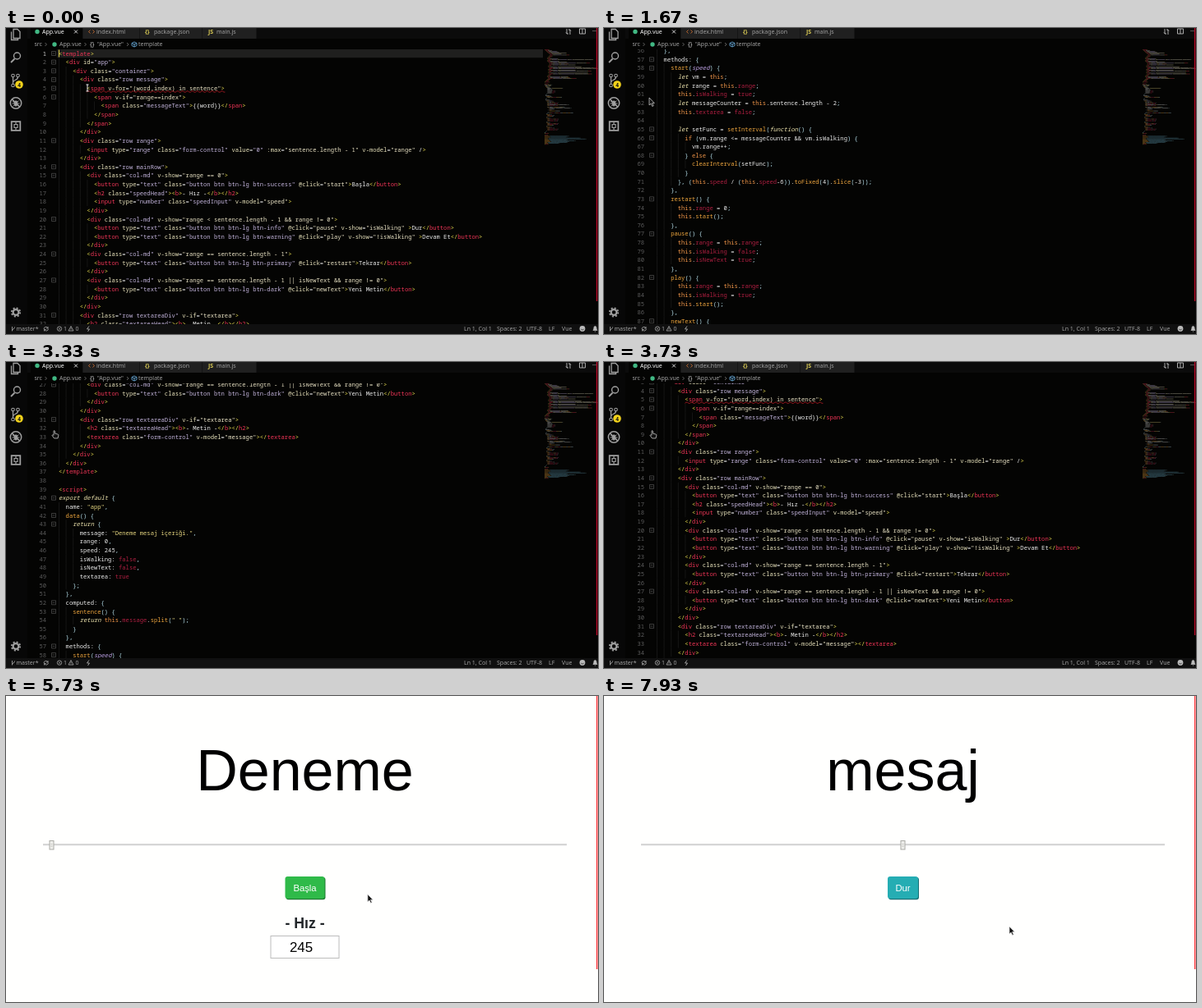
Write an HTML page that moves like this. It is 720 by 373 pixels and loops after 8000 ms.

```html
<!DOCTYPE html>
<html lang="tr">
<head>
<meta charset="utf-8">
<title>Word reader</title>
<style>
html, body { margin: 0; width: 100%; height: 100%; overflow: hidden; background: #000; }
svg { display: block; width: 100vw; height: 100vh; }
text { white-space: pre; }
.code { font: 500 7.17px "Noto Sans Mono", "DejaVu Sans Mono", monospace; }
.num { font-weight: 400; text-anchor: end; }
.ui { font: 7px "Noto Sans", "Open Sans", sans-serif; fill: #a0a0a0; }
.page { font-family: "Liberation Sans", Arial, sans-serif; text-anchor: middle; }
</style>
</head>
<body>
<svg id="stage" viewBox="0 0 720 373">
  <clipPath id="pane"><rect x="26" y="26" width="694" height="335"/></clipPath>
</svg>
<script>
const SOURCE = `<template>
  <div id="app">
    <div class="container">
      <div class="row message">
        <span v-for="(word,index) in sentence">
          <span v-if="range==index">
            <span class="messageText">{{word}}</span>
          </span>
        </span>
      </div>
      <div class="row range">
        <input type="range" class="form-control" value="0" :max="sentence.length - 1" v-model="range" />
      </div>
      <div class="row mainRow">
        <div class="col-md" v-show="range == 0">
          <button type="text" class="button btn btn-lg btn-success" @click="start">Başla</button>
          <h2 class="speedHead"><b>- Hız -</b></h2>
          <input type="number" class="speedInput" v-model="speed">
        </div>
        <div class="col-md" v-show="range < sentence.length - 1 && range != 0">
          <button type="text" class="button btn btn-lg btn-info" @click="pause" v-show="isWalking" >Dur</button>
          <button type="text" class="button btn btn-lg btn-warning" @click="play" v-show="!isWalking" >Devam Et</button>
        </div>
        <div class="col-md" v-show="range == sentence.length - 1">
          <button type="text" class="button btn btn-lg btn-primary" @click="restart">Tekrar</button>
        </div>
        <div class="col-md" v-show="range == sentence.length - 1 || isNewText && range != 0">
          <button type="text" class="button btn btn-lg btn-dark" @click="newText">Yeni Metin</button>
        </div>
      </div>
      <div class="row textareaDiv" v-if="textarea">
        <h2 class="textareaHead"><b>- Metin -</b></h2>
        <textarea class="form-control" v-model="message"></textarea>
      </div>
    </div>
  </div>
</template>

<script>
export default {
  name: "app",
  data() {
    return {
      message: "Deneme mesaj içeriği.",
      range: 0,
      speed: 245,
      isWalking: false,
      isNewText: false,
      textarea: true
    };
  },
  computed: {
    sentence() {
      return this.message.split(" ");
    }
  },
  methods: {
    start(speed) {
      let vm = this;
      let range = this.range;
      this.isWalking = true;
      let messageCounter = this.sentence.length - 2;
      this.textarea = false;

      let setFunc = setInterval(function() {
        if (vm.range <= messageCounter && vm.isWalking) {
          vm.range++;
        } else {
          clearInterval(setFunc);
        }
      }, (this.speed / (this.speed-6)).toFixed(4).slice(-3));
    },
    restart() {
      this.range = 0;
      this.start();
    },
    pause() {
      this.range = this.range;
      this.isWalking = false;
      this.isNewText = true;
    },
    play() {
      this.range = this.range;
      this.isWalking = true;
      this.start();
    },
    newText() {
      this.range = 0;
      this.isWalking = false;
      this.textarea = true;
    }
  }
};
<\/script>

<style>
.container { margin-top: 20px; text-align: center; }
.messageText { font-size: 120px; color: black; }
.message { min-height: 200px; justify-content: center; align-items: center; }
.button { box-shadow: 2px 2px 2px rgba(0, 0, 0, 0.5); margin: 10px; border-radius: 6px; }
.speedHead { margin-top: 20px; font-size: 30px; }
.speedInput { width: 140px; text-align: center; font-size: 28px; }
.textareaHead { margin-top: 30px; font-size: 30px; }
.range { margin-top: 40px; margin-bottom: 40px; }
.mainRow { text-align: center; }
</style>`.split("\n");

const NS = "http://www.w3.org/2000/svg";
const ROW = 10.63, CHAR = 4.302, LEFT = 64, LOOP = 8000;
const stage = document.getElementById("stage");

function el(tag, attrs, parent, text) {
  const node = document.createElementNS(NS, tag);
  for (const key in attrs) node.setAttribute(key, attrs[key]);
  if (text !== undefined) node.textContent = text;
  return parent.appendChild(node);
}
const group = (parent, attrs = {}) => el("g", attrs, parent);
const box = (p, x, y, width, height, fill, more) => el("rect", { x, y, width, height, fill, ...more }, p);
const line = (p, d, stroke, width = 1, fill = "none") => el("path", { d, stroke, "stroke-width": width, fill }, p);
const label = (p, x, y, text, more) => el("text", { x, y, ...more }, p, text);
const show = (node, on) => node.setAttribute("display", on ? "inline" : "none");
const move = (node, x, y) => node.setAttribute("transform", `translate(${x} ${y})`);

// Syntax colouring: each capture group pairs with a colour by index.
const MARKUP = {
  rule: /((?<=(?:v-|[@:])[a-z]+=)"[^"]*")|("[^"]*")|((?<=<\/?)[a-z]\w*)|(<\/?|\/?>)|([@:]?[a-z][\w-]*(?==))|([^"<>=@:a-z]+|.)/g,
  colors: ["#e9e2c4", "#c3b4dc", "#ee3556", "#e8dc50", "#e9e3bc", "#ececec"]
};
const SCRIPT = {
  rule: /("[^"]*")|\b(let|function|export|default|return)\b|\b(this|if|else)\b|((?<=this\.)(?!start|sentence)\w+|\b(?:true|false)\b)|(\w+(?=\())|([{}();,]+)|((?<=\()speed(?=\)))|(\w+|.)/g,
  colors: ["#e6d680", "#f1e7b0", "#ee9448", "#ad1f40", "#eda53e", "#b4dde8", "#c0a4e8", "#ececec"]
};
const STYLE = {
  rule: /(\.[a-zA-Z]+(?= \{))|([a-z-]+(?=:))|([{}:;])|([^{}:;]+)/g,
  colors: ["#eda53e", "#4a9cc8", "#8fccdd", "#6cb4cf"]
};
const styleStart = SOURCE.lastIndexOf("<style>");
function tokens(text, row) {
  const set = /^\s*<\/?\w/.test(text) ? MARKUP : row > styleStart ? STYLE : SCRIPT;
  return [...text.matchAll(set.rule)].map(m => {
    const kind = m.slice(1).findIndex(part => part !== undefined);
    return {
      text: m[0], at: m.index, color: set.colors[kind],
      italic: set === SCRIPT && (kind === 1 || kind === 6)
    };
  });
}

// Editor
const editor = group(stage);
box(editor, 0, 0, 720, 373, "#040403");
const pane = group(editor, { "clip-path": "url(#pane)" });
const code = group(pane);
const map = group(editor, { opacity: .5 });
box(code, 62, 25.8, 591, 10.4, "#1f1f1e");

const indentOf = text => text.search(/\S/);
let depth = 0;
SOURCE.forEach((text, i) => {
  const y = 31 + i * ROW, indent = indentOf(text);
  if (indent >= 0) depth = indent;
  label(code, 49, y + 2.6, i + 1, { class: "code num", fill: i ? "#5c5c5c" : "#d0d0d0" });
  for (let c = 0; c < depth; c += 2)
    line(code, `M${LEFT + c * CHAR + .5} ${y - 5.3}v${ROW}`, "#232323", .6);
  if (indent >= 0 && indentOf(SOURCE[i + 1] || "") > indent)
    line(code, `M55.5 ${y - 2.5}h5v5h-5zM56.6 ${y}h2.8`, "#606060", .6);
  const row = label(code, LEFT, y + 2.6, "", { class: "code" });
  row.append(" ".repeat(Math.max(0, indent)));
  for (const part of tokens(text, i)) {
    if (part.at < indent) continue;
    el("tspan", { fill: part.color, "font-style": part.italic ? "italic" : "normal" }, row, part.text);
    if (part.text.trim())
      box(map, 655 + part.at * .57, 26 + i * 1.1, part.text.length * .57, .6, part.color);
  }
});
let wave = `M98.4 ${31 + 4 * ROW + 4.6}`;
for (let i = 0; i < 56; i++) wave += `l1.5 ${i % 2 ? 1.2 : -1.2}l1.5 0`;
line(code, wave, "#d3202c", .7);
line(code, "M64.5 26.5v9", "#f2e34f", .9);

// Tabs and breadcrumb
const ui = group(editor, { class: "ui" });
box(ui, 26, 0, 694, 13, "#0b0b0b");
box(ui, 30, 0, 63, 13, "#040403");
[[93.5, 68.5], [162.5, 75.5], [238.5, 66]].forEach(([x, w]) => box(ui, x, 0, w, 13, "#202020"));
const dot = (x, y) => el("circle", { cx: x, cy: y, r: 2.7, fill: "#41b883" }, ui);
dot(38, 4.5);
label(ui, 44, 6.7, "App.vue", { fill: "#fff" });
line(ui, "M83 2.5l4 4m0-4l-4 4", "#eee", .9);
line(ui, "M102.5 2.5l-2 2 2 2m3-4l2 2-2 2", "#e37933", .8);
label(ui, 110, 6.7, "index.html");
label(ui, 169, 6.7, "{}", { fill: "#d9ca55", "font-weight": 700 });
label(ui, 180, 6.7, "package.json");
label(ui, 246, 6.7, "JS", { fill: "#d9ca55", "font-weight": 700 });
label(ui, 256, 6.7, "main.js");
line(ui, "M682 1v6h2m-3-1.5l1.5 1.5M686 8V2h-2m3 1.5l-1.5-1.5M697.5 1h7v6h-7zM701 1v6", "#bbb", .9);
label(ui, 713, 6, "···", { "font-weight": 700 });
label(ui, 34.5, 22.4, "src");
dot(59, 20);
label(ui, 65, 22.4, "App.vue");
label(ui, 102, 22.4, "{}", { fill: "#ddd" });
label(ui, 111, 22.4, "\"App.vue\"");
line(ui, "M153 18.5l3-1.5 3 1.5v3l-3 1.5-3-1.5zl3 1.5 3-1.5m-3 1.5v3", "#6fb6ea", .8);
label(ui, 161, 22.4, "template");
line(ui, "M47.5 18l2 2-2 2M95.5 18l2 2-2 2M147 18l2 2-2 2", "#888", .7);

// Activity bar
box(ui, 0, 0, 26, 361, "#070707");
const GREY = "#a0a0a0";
line(ui, "M6.5 4.5v10h8v-2M9 1.5h5l3 3v8H9z", GREY, 1.3);
line(ui, "M10.5 37.5L6 42", GREY, 1.8);
el("circle", { cx: 13.5, cy: 34, r: 4, fill: "none", stroke: GREY, "stroke-width": 1.4 }, ui);
line(ui, "M8.5 59.5v9M14.5 59.5c0 5-6 3-6 7", GREY, 1.3);
[[8.5, 58], [14.5, 58], [8.5, 70]].forEach(([cx, cy]) =>
  el("circle", { cx, cy, r: 1.8, fill: "#070707", stroke: GREY, "stroke-width": 1.1 }, ui));
el("circle", { cx: 16, cy: 69, r: 4.8, fill: "#f2d21b" }, ui);
label(ui, 14.2, 71.5, "4", { fill: "#111", "font-weight": 700, "font-size": 6.5 });
el("circle", { cx: 12, cy: 91.5, r: 6.7, fill: "none", stroke: GREY, "stroke-width": 1.5 }, ui);
el("ellipse", { cx: 12, cy: 92, rx: 2.3, ry: 3.4, fill: GREY }, ui);
line(ui, "M8 89l8 6M7.5 92h9M8.5 95.5l7-7", GREY, .9);
line(ui, "M7.2 86.7l9.6 9.6", GREY, 1.5);
line(ui, "M6.7 114.2h10.6v10.6h-10.6z", GREY, 1.8);
line(ui, "M10 117.5h4v4h-4zM12 114v3M12 121.5v3", GREY, 1.2);
el("circle", { cx: 12, cy: 346.5, r: 3.4, fill: "none", stroke: GREY, "stroke-width": 2.2 }, ui);
el("circle", { cx: 12, cy: 346.5, r: 5.2, fill: "none", stroke: GREY, "stroke-width": 1.8, "stroke-dasharray": "2.04 2.04" }, ui);

// Status bar
box(ui, 0, 361, 720, 12, "#101010");
line(ui, "M7.5 364v5.5M10.5 364.5c0 3-3 2-3 4.5", "#aaa", .8);
label(ui, 12.5, 369.2, "master*");
line(ui, "M46 367a2.6 2.6 0 0 1 5-1m0-2v2h-2M51.5 366.5a2.6 2.6 0 0 1-5 1m0 2v-2h2", "#aaa", .8);
el("circle", { cx: 65, cy: 366.6, r: 2.7, fill: "none", stroke: "#aaa", "stroke-width": .8 }, ui);
line(ui, "M64 365.6l2 2m0-2l-2 2M76 369l3-5.5 3 5.5zM79 365.5v2", "#aaa", .8);
label(ui, 70, 369.2, "1");
label(ui, 84.5, 369.2, "0");
line(ui, "M101 363.5l-2.5 3.5h3l-2 3", "#aaa", .9);
[[557, "Ln 1, Col 1"], [597, "Spaces: 2"], [633, "UTF-8"], [660, "LF"], [676, "Vue"]]
  .forEach(([x, text]) => label(ui, x, 369.2, text));
el("circle", { cx: 701, cy: 366.5, r: 3.4, fill: "#bbb" }, ui);
line(ui, "M699.3 367.2q1.7 2 3.4 0", "#101010", .7);
line(ui, "M714 368.5h5q-1-1-1-3t-1.5-2-1.5 2-1 3zM716 370h1", "#bbb", .8, "#bbb");
line(ui, "M718.6 0V333", "#b80a28", 1.4);

// Page
const page = group(stage, { class: "page" });
box(page, 0, 0, 720, 373, "#fffffe");
const body = group(page);
const word = label(body, 0, 115, "", { "font-size": 70 });
box(body, -318.5, 180, 637, 2.3, "#d6d6d6");
const thumb = group(body);
box(thumb, -2.5, 176.5, 5, 10.5, "#f1f1ee", { stroke: "#a9a9a4", "stroke-width": 1 });
line(thumb, "M-1 180h2M-1 181.8h2M-1 183.6h2", "#b0b0a8", .6);

function button(x, width, text, color, edge, parent = body) {
  const g = group(parent);
  box(g, x - width / 2 + 1, 221, width, 27.3, edge, { rx: 3 });
  box(g, x - width / 2, 220, width, 27, color, { rx: 3 });
  label(g, x, 237.5, text, { "font-size": 11.3, fill: "#fff" });
  return g;
}
const heading = (parent, y, text) =>
  label(parent, 0, y, text, { "font-size": 17.7, "font-weight": 700, fill: "#212529" });

const startView = group(body);
button(0, 48, "Başla", "#2fba49", "#1c7a30", startView);
heading(startView, 283, "- Hız -");
box(startView, -41.5, 292.5, 83, 27, "#fff", { stroke: "#bcbcbc" });
label(startView, -4.5, 312.2, "245", { "font-size": 16.9 });
const form = group(body);
heading(form, 359, "- Metin -");
box(form, -318.5, 368.7, 637, 30, "#fff", { stroke: "#d8d8d8", rx: 2.5 });
const runView = button(0, 37, "Dur", "#25adb3", "#186f74");
const endView = group(body);
button(-159, 50.5, "Tekrar", "#0d80fb", "#0a55a6", endView);
button(159.5, 70.5, "Yeni Metin", "#373b40", "#1c1e21", endView);
line(page, "M718.7 0V333", "#fb3b40", 1.5);

// Pointer shapes
const pointer = group(stage);
const shapes = {
  arrow: line(pointer, "M0 0V9L2.1 7.2 3.7 10.5 5.2 9.8 3.6 6.6H6.3z", "#ddd", .7, "#111"),
  beam: line(pointer, "M-1.5-4H1.5M0-4V4M-1.5 4H1.5", "#eee", 1),
  hand: line(pointer, "M0 0q1.2-1 1.6.6V3.2L5 4q1 .3.8 1.5L5 9H.5L-2 5.5q0-1.2 2-.3z", "#ddd", .7, "#111")
};

// Motion: rows of [time, ...values]
const SCROLL = [[0, 0], [350, 0], [950, 250], [1670, 587.5], [2180, 850], [2330, 850], [2800, 615], [3730, 28], [3900, 0]];
const MOUSE = [[0, 99, 73], [150, 99, 73], [500, 55, 85], [1670, 55, 85], [2800, 58, 84], [3730, 58, 84],
  [4600, 63, 84], [5300, 358, 235], [5640, 358, 235], [6000, 682, 262], [6200, 702, 274], [6520, 495, 273],
  [6740, 495, 273], [7020, 330, 99], [7380, 205, 234], [7600, 205, 234], [7780, 390, 306], [7920, 493, 281]];

function sample(keys, t) {
  const next = keys.findIndex(k => k[0] > t);
  if (next < 0) return keys[keys.length - 1].slice(1);
  const a = keys[next - 1], b = keys[next], p = (t - a[0]) / (b[0] - a[0]);
  return a.slice(1).map((v, i) => v + (b[i + 1] - v) * p);
}

const WORDS = ["Deneme", "mesaj", "içeriği."];
const OPEN = 4380, PLAY = 5620, REPLAY = 7590, STEP = 251;

function render(t) {
  const inPage = t >= OPEN;
  show(editor, !inPage);
  show(page, inPage);
  const [x, y] = sample(MOUSE, t);
  let shape = "arrow";
  if (inPage) {
    const began = t >= REPLAY ? REPLAY : PLAY;
    const range = Math.max(0, Math.min(2, Math.floor((t - began) / STEP)));
    move(body, t < PLAY ? 359.5 : 363.5, 0);
    move(thumb, (range - 1) * 308, 0);
    word.textContent = WORDS[range];
    show(form, t < PLAY);
    show(startView, range === 0);
    show(runView, range === 1);
    show(endView, range === 2);
    const inside = (cx, w) => Math.abs(x - cx) < w / 2 && y > 220 && y < 248;
    if (range === 2 ? inside(204.5, 50) : inside(361, 45)) shape = "hand";
  } else {
    move(code, 0, -sample(SCROLL, t)[0]);
    if (x > 63) shape = "beam";
    else if (t > 3000) shape = "hand";
  }
  move(pointer, x, y);
  for (const name in shapes) show(shapes[name], name === shape);
}

const begin = performance.now();
function tick() {
  render((performance.now() - begin) % LOOP);
  requestAnimationFrame(tick);
}
render(0);
requestAnimationFrame(tick);
</script>
</body>
</html>
```
